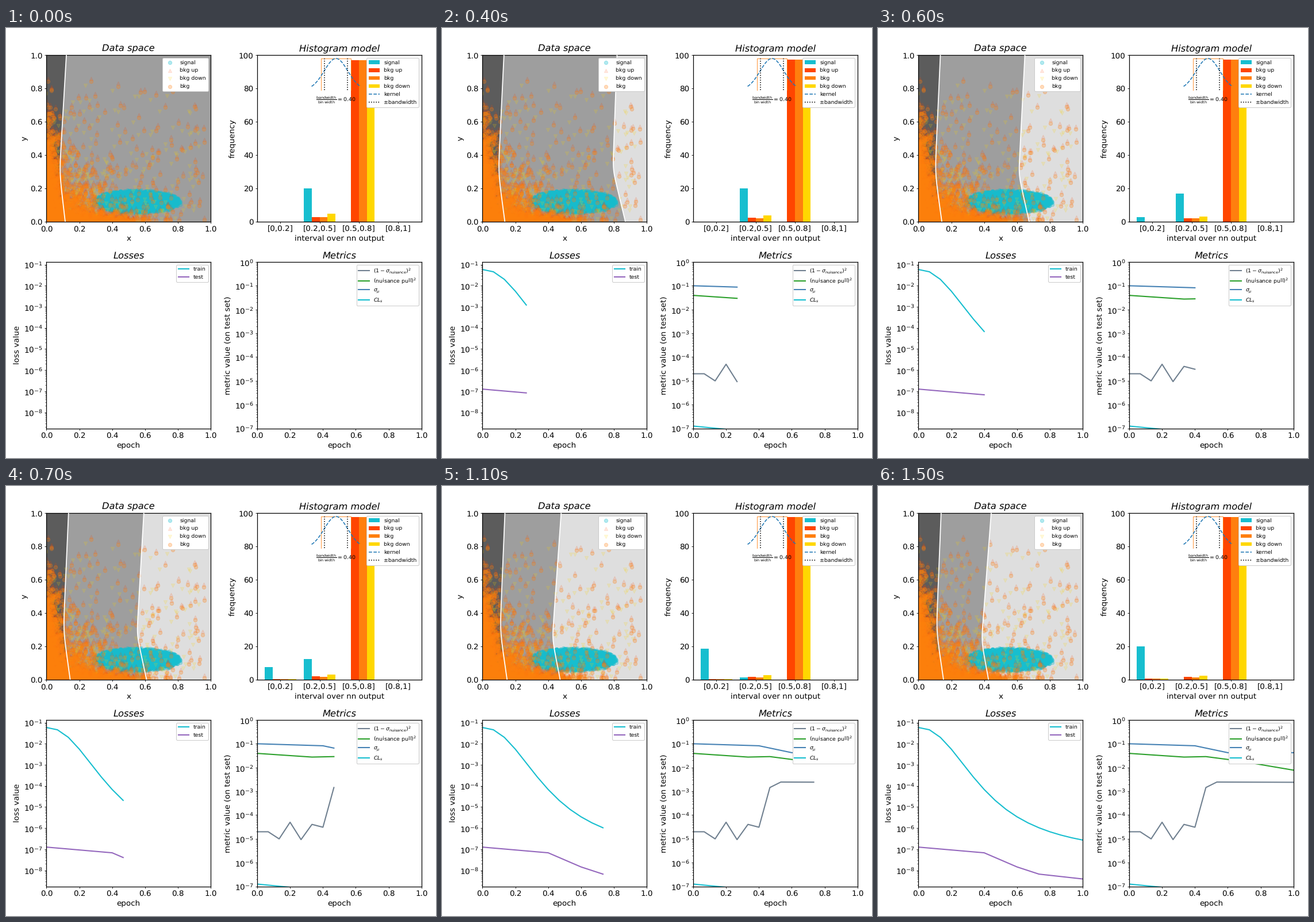
A matplotlib script that plays this animation: 748x748 px, repeating every 1600 ms.

```python
import numpy as np
import matplotlib.pyplot as plt
from matplotlib.animation import FuncAnimation
from matplotlib.patches import Patch

SIZE = 748
FRAMES = 16
CYAN, UP, BKG, DOWN = "C9", "orangered", "C1", "gold"

plt.rcParams.update({
    "font.family": "DejaVu Sans",
    "font.size": 13,
    "text.hinting": "none",
    "axes.linewidth": 1.2,
    "xtick.major.size": 3,
    "ytick.major.size": 3,
    "legend.fontsize": 9,
    "legend.framealpha": 1,
    "legend.labelspacing": 0.55,
    "legend.loc": "upper right",
})

fig = plt.figure(figsize=(10, 10), dpi=SIZE / 10)
rng = np.random.default_rng(7)
epochs = np.arange(FRAMES)


def panel(left, top, width, height):
    """Axes placed by pixel box, measured from the top left."""
    return fig.add_axes([left / SIZE, 1 - (top + height) / SIZE,
                         width / SIZE, height / SIZE])


def label(ax, title, xlabel, ylabel):
    ax.set_title(title, style="italic")
    ax.set_xlabel(xlabel)
    ax.set_ylabel(ylabel)


def settle(t, scale, power=1):
    """Ease from 0 towards 1, starting at t = 0."""
    return 1 - np.exp(-(max(t, 0) / scale) ** power)


LEFT, TOP, W, H = 70.4, 47.4, 285.8, 289.6
data_ax = panel(LEFT, TOP, W, H)
hist_ax = panel(437, TOP, W, H)
loss_ax = panel(LEFT, 407, W, H)
metric_ax = panel(437, 407, W, H)


# ---- Data space -------------------------------------------------------

label(data_ax, "Data space", "x", "y")
data_ax.set(xlim=(0, 1), ylim=(0, 1), facecolor="#9e9e9e")

# Background hugs both axes and thins out towards the middle
near_y = rng.exponential(0.03, 1300), np.abs(rng.normal(0, 0.23, 1300))
near_x = np.abs(rng.normal(0, 0.23, 1300)), rng.exponential(0.02, 1300)
corner = rng.exponential(0.11, 900), rng.exponential(0.13, 900)
wide = rng.uniform(0, 0.98, 190), rng.exponential(0.4, 190)
x, y = np.hstack([near_y, near_x, corner, wide])
keep = y < 0.86
x, y = x[keep], y[keep]

angle = rng.uniform(0, 2 * np.pi, 1700)
radius = np.sqrt(rng.uniform(0, 1, angle.size))
sig_x = 0.55 + 0.26 * radius * np.cos(angle) + rng.normal(0, 0.006, 1700)
sig_y = 0.121 + 0.067 * radius * np.sin(angle) + rng.normal(0, 0.003, 1700)

data_ax.scatter(sig_x, sig_y, color=CYAN, alpha=0.33, label="signal")
data_ax.scatter(x, y + 0.018, color=UP, marker="^", alpha=0.12,
                label="bkg up")
data_ax.scatter(x - 0.035, y - 0.025, color=DOWN, marker="v", alpha=0.14,
                label="bkg down")
data_ax.scatter(x, y, color=BKG, alpha=0.28, label="bkg")
data_ax.legend()

dark, = data_ax.fill([0, 0, 0], [0, 0, 0], color="#5c5c5c", lw=0, zorder=0.5)
light, = data_ax.fill([0, 0, 0], [0, 0, 0], color="#dedede", lw=0, zorder=0.5)
edges = [data_ax.plot([], [], "w", lw=1.7, zorder=3)[0] for _ in range(2)]

rows = np.linspace(TOP, TOP + H, 120)


def boundary(top, knee_x, knee_y, bottom, soft=2):
    """Two straight runs, in stage pixels, blended at a knee."""
    upper = knee_x + (top - knee_x) * (knee_y - rows) / (knee_y - TOP)
    lower = knee_x + (bottom - knee_x) * (rows - knee_y) / (TOP + H - knee_y)
    curve = soft * np.logaddexp(upper / soft, lower / soft)
    return (curve - LEFT) / W, (TOP + H - rows) / H


def draw_regions(i):
    a = settle(i, 5)
    top = 192 + 84.5 * np.exp((5 - i) / 3.5)
    curves = [
        boundary(105 + 5 * a, 93 + 9 * a, 252, 103 + 11.5 * a),
        boundary(top, top + 6 - 24 * a, 215 + 58 * a, top + 41 - 48 * a),
    ]
    for line, region, (bx, by), side in zip(edges, (dark, light),
                                            curves, (0, 3)):
        line.set_data(bx, by)
        region.set_xy(np.column_stack([np.r_[side, bx, side],
                                       np.r_[1, by, 0]]))


# ---- Histogram --------------------------------------------------------

label(hist_ax, "Histogram model", "interval over nn output", "frequency")
hist_ax.set(xlim=(-0.59, 3.59), ylim=(0, 100))
hist_ax.set_xticks(range(4), ["[0,0.2]", "[0.2,0.5]", "[0.5,0.8]", "[0.8,1]"])

bars = [hist_ax.bar(np.arange(4) + dx, [0] * 4, 0.2, color=color)
        for dx, color in zip((-0.3, -0.1, 0.1, 0.3), (CYAN, UP, BKG, DOWN))]


def draw_bars(i):
    moved = settle(i - 5, 3.2, 1.6)
    third = 97 + 0.7 * settle(i, 4)
    counts = [(19.9 * moved, 19.9 * (1 - moved), 0, 0)]
    for start, end in ((2.9, 1.4), (2.9, 1.2), (4.8, 2.15)):
        second = start + (end - start) * settle(i, 7)
        counts.append((0.55 * moved, second, third, 0))
    for group, heights in zip(bars, counts):
        for bar, height in zip(group, heights):
            bar.set_height(height)


# Kernel sketch, in units of the bandwidth
SPAN = 2.07
kernel_ax = panel(531.6, 53, 84.8, 55)
kernel_ax.axis("off")
kernel_ax.set(xlim=(-SPAN, SPAN), ylim=(0, 1))
t = np.linspace(-SPAN, SPAN, 200)
kernel_ax.plot([-1.25, -1.25, 1.25, 1.25], [0, 1, 1, 0], color=BKG, lw=1,
               alpha=0.8, clip_on=False)
kernel, = kernel_ax.plot(t, np.exp(-t**2 / 2), "--", color="C0",
                         clip_on=False)
for side in (-1, 1):
    width, = kernel_ax.plot([side, side], [0, 1], "k:", clip_on=False)
fig.text(574 / SIZE, 1 - 124.5 / SIZE,
         r"$\frac{\mathrm{bandwidth}}{\mathrm{bin\,width}}=0.40$",
         ha="center", va="center", fontsize=9)

hist_ax.legend(
    [Patch(color=c, lw=0) for c in (CYAN, UP, BKG, DOWN)] + [kernel, width],
    ["signal", "bkg up", "bkg", "bkg down", "kernel", "±bandwidth"])


# ---- Curves -----------------------------------------------------------

def track(*keys):
    """Values from (epoch, exponent) key points, straight in between."""
    return 10 ** np.interp(epochs, *zip(*keys))


fall = (epochs / 6.2) ** 2.2
train = 10 ** (-1.23 - 6.1 * fall / (1 + fall))
test = track((0, -6.9), (6, -7.17), (9, -7.84), (11, -8.18), (15, -8.41))
sigma_mu = track((0, -1), (6, -1.085), (9, -1.375), (15, -1.375))
pull = track((0, -1.405), (5, -1.56), (7, -1.54), (10, -1.72), (15, -2.11))
pull_width = track((0, -4.7), (1, -4.7), (2, -5), (3, -4.3), (4, -5.03),
                   (5, -4.39), (6, -4.51), (7, -2.84), (8, -2.61),
                   (15, -2.62))

label(loss_ax, "Losses", "epoch", "loss value")
label(metric_ax, "Metrics", "epoch", "metric value (on test set)")
loss_ax.set(xlim=(0, 1), yscale="log", ylim=(10**-8.765, 10**-0.873))
metric_ax.set(xlim=(0, 1), yscale="log", ylim=(1e-7, 1))

curves = []
for ax, values, color, name in [
    (loss_ax, train, CYAN, "train"),
    (loss_ax, test, "C4", "test"),
    (metric_ax, pull_width, "slategray",
     r"$(1-\sigma_{\mathrm{nuisance}})^2$"),
    (metric_ax, pull, "C2", "(nuisance pull)$^2$"),
    (metric_ax, sigma_mu, "steelblue", r"$\sigma_\mu$"),
    (metric_ax, test, CYAN, "$CL_s$"),
]:
    line, = ax.plot([], [], color=color, lw=2, label=name)
    curves.append((line, values))
loss_ax.legend()
metric_ax.legend(labelspacing=0.45)


def draw(i):
    draw_regions(i)
    draw_bars(i)
    for line, values in curves:
        line.set_data(epochs[:i + 1] / (FRAMES - 1), values[:i + 1])
    return []


anim = FuncAnimation(fig, draw, frames=FRAMES, interval=100, repeat=True,
                     repeat_delay=0)
plt.show()
```
